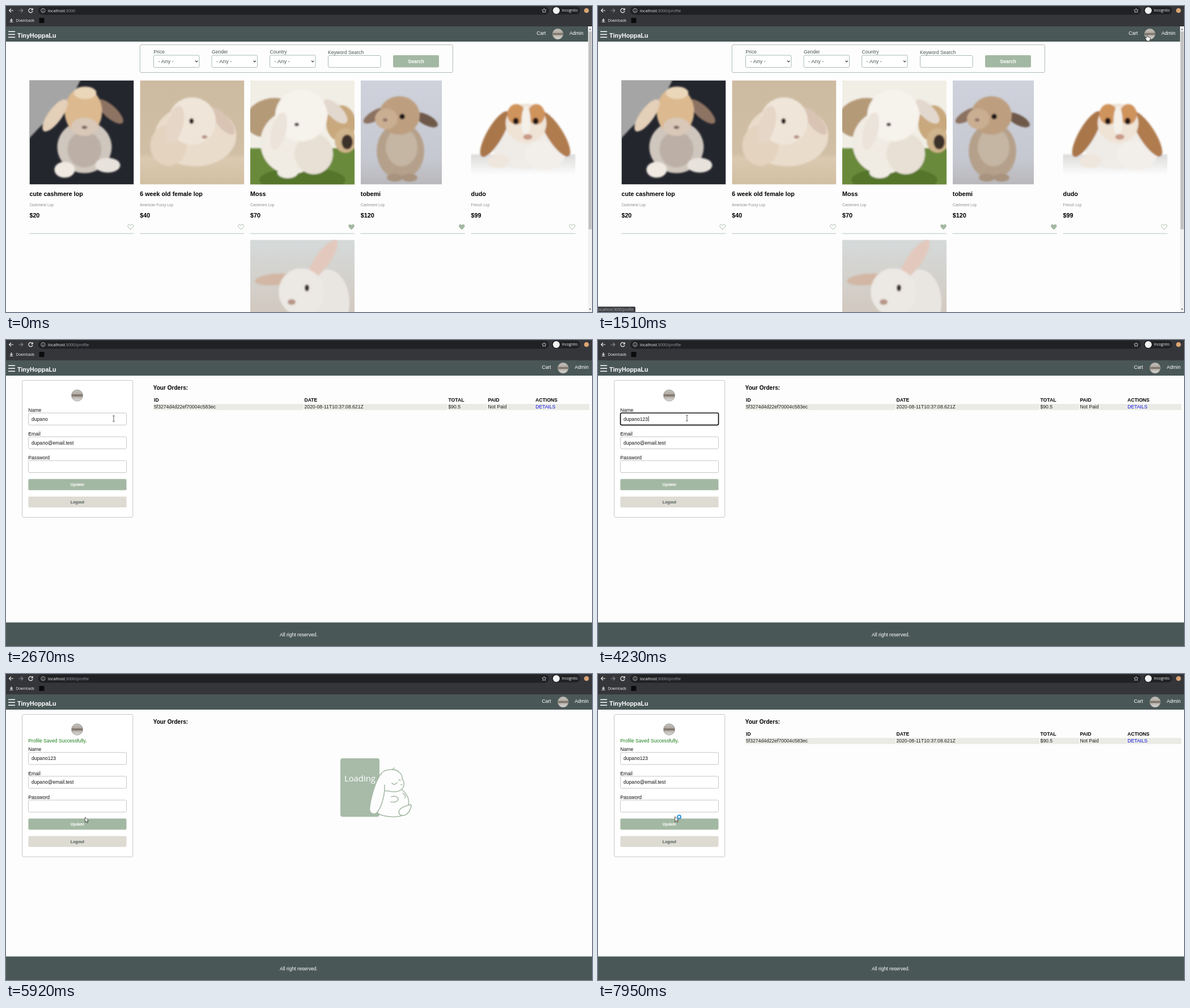
Write an HTML page that moves like this. It is 1034x541 px and loops after 8000 ms.

```html
<!DOCTYPE html>
<html lang="en">
<head>
<meta charset="utf-8">
<title>Rabbit shop profile</title>
<style>
  html, body { margin: 0; width: 100%; height: 100%; overflow: hidden; background: #fdfdfd; }
  svg { display: block; }
  text { font: 8.62px "Liberation Sans", Arial, sans-serif; white-space: pre; }
  .ui { font-family: "Open Sans", "Noto Sans", sans-serif; }
</style>
</head>
<body>
<svg id="stage" width="1034" height="541" viewBox="0 0 1034 541"></svg>
<script>
const SAGE = '#a3b8a3', SLATE = '#4a5757', LOOP = 8000;

// Markup helpers
const text = (x, y, s, o = {}) =>
  `<text x="${x}" y="${y}" fill="${o.fill || '#111'}" class="${o.cls || ''}"` +
  ` style="font-size:${o.size || 8.62}px;font-weight:${o.bold ? 700 : 400}"` +
  ` text-anchor="${o.anchor || 'start'}"${o.id ? ` id="${o.id}"` : ''}>${s}</text>`;
const rect = (x, y, w, h, fill, more = '') =>
  `<rect x="${x}" y="${y}" width="${w}" height="${h}" fill="${fill}" ${more}/>`;
const box = (x, y, w, h, line, id = '') =>
  rect(x, y, w, h, '#fff', `rx="2.2" stroke="${line}" ${id && `id="${id}"`}`);
const line = (d, color, width = 1, more = '') =>
  `<path d="${d}" fill="none" stroke="${color}" stroke-width="${width}" ${more}/>`;
const oval = (x, y, rx, ry, fill, turn = 0) =>
  `<ellipse cx="${x}" cy="${y}" rx="${rx}" ry="${ry}" fill="${fill}" transform="rotate(${turn} ${x} ${y})"/>`;
const group = (id, s, more = '') => `<g id="${id}" ${more}>${s}</g>`;
const fade = (id, ...stops) => `<linearGradient id="${id}" x2="0" y2="1">` +
  stops.map(([at, c]) => `<stop offset="${at}" stop-color="${c}"/>`).join('') + '</linearGradient>';
const photo = (x, y, w, h, back, shapes) =>
  `<svg x="${x}" y="${y}" width="${w}" height="${h}">${rect(0, 0, w, h, back)}` +
  `<g filter="url(#soft)">${shapes.join('')}</g></svg>`;
const avatar = (x, y, r) =>
  `<circle cx="${x}" cy="${y}" r="${r}" fill="url(#fur)" stroke="#8d9391" stroke-width=".8"/>`;

const defs = `<defs><filter id="soft"><feGaussianBlur stdDeviation="1.5"/></filter>` +
  fade('fur', [0, '#c2beb8'], [.35, '#b5aea6'], [.5, '#71685f'], [.65, '#bcb6ae'], [1, '#dcd9d5']) +
  fade('carpet', [0, '#cdbba1'], [.7, '#d0bfa5'], [.75, '#dac9b0'], [1, '#d2bfa3']) +
  fade('wall', [0, '#cfd2dc'], [.75, '#c6c8d1'], [1, '#b9b8bb']) +
  fade('floor', [0, '#dcdbda'], [1, '#fdfdfd']) +
  fade('room', [0, '#d5dada'], [1, '#d2c9c0']) + '</defs>';

const browser = rect(0, 0, 1034, 36, '#35363a') + rect(57, 1, 901, 14.5, '#202124', 'rx="7.2"') +
  line('M13 8H6M9 4.6 5.6 8 9 11.4', '#eee', 1.2) +
  line('M22.5 8h7M26.5 4.6 29.9 8l-3.4 3.4', '#85878a', 1.2) +
  line('M46.6 6.2A3.6 3.6 0 1 0 47 9M47.2 4V7H44', '#eee', 1.2) +
  line('M65.4 7.6V10.4M65.4 5.6V6.6M69 8a3.6 3.6 0 1 1-7.2 0 3.6 3.6 0 1 1 7.2 0', '#d5d6d8', .8) +
  text(74, 10.8, 'localhost<tspan fill="#9aa0a6" id="path"></tspan>', { fill: '#f1f1f1', size: 7.15, cls: 'ui' }) +
  line('M949.5 4.3l1.1 2.5 2.7.3-2 1.8.6 2.7-2.4-1.4-2.4 1.4.6-2.7-2-1.8 2.7-.3z', '#d5d6d8', .8) +
  rect(963, 1, 50, 14, '#202124', 'rx="7"') + oval(971, 8, 6, 6, '#f4f4f4') +
  text(981, 10.4, 'Incognito', { fill: '#f1f1f1', size: 6.4, cls: 'ui' }) +
  oval(1024.3, 8, 4.3, 4.3, '#d9a574') +
  line('M9.5 22v4.5M7.3 24.4l2.2 2.2 2.2-2.2M6.5 28.3h6', '#eee', 1.1) +
  text(17.5, 27.8, 'Downloads', { fill: '#f1f1f1', size: 6.25, cls: 'ui' }) +
  rect(58.5, 21, 9, 9, '#0c0c0c');

const header = rect(0, 36, 1034, 27, SLATE) + line('M4 45.2h12M4 50.2h12M4 55.2h12', '#fff', 1.5) +
  text(20, 55.6, 'TinyHoppaLu', { fill: '#fff', size: 10.77, bold: 1 }) +
  group('account', text(945.5, 51.4, 'Cart', { fill: '#fff' }) + avatar(983, 49.5, 9.4) +
    text(1003.6, 51.4, 'Admin', { fill: '#fff' }));

// Shop page
const filters = rect(236.4, 68.5, 552, 49, 'none', 'rx="2.2" stroke="#adbdb3"') +
  ['Price', 'Gender', 'Country'].map((s, i) => {
    const x = 260.5 + i * 102.5;
    return text(x, 84.4, s, { fill: '#4a5757' }) + box(x, 87, 80.5, 21.5, '#a9bcb0') +
      text(x + 8, 101, '- Any -', { fill: '#4a5757', size: 9.5 }) +
      line(`M${x + 73.5} 96.6l2.2 2.3 2.2-2.3`, '#333', 1.1);
  }).join('') +
  text(568, 84.9, 'Keyword Search', { fill: '#4a5757' }) + box(568.5, 87.5, 92.5, 21, '#a9bcb0') +
  rect(683, 87, 81, 21.5, SAGE, 'rx="2.2"') +
  text(723.5, 100.9, 'Search', { fill: '#fff', bold: 1, anchor: 'middle' });

const HEART = 'M0 4.4C-7.2-.8-4.9-4.3-2.5-4.1-1-4 0-2.9 0-2.3 0-2.9 1-4 2.5-4.1 4.9-4.3 7.2-.8 0 4.4Z';
const card = (i, name, breed, price, liked) => {
  const x = 41.4 + i * 194.8;
  return text(x, 336, name, { size: 10.77, bold: 1, fill: '#000' }) +
    text(x, 353.9, breed, { size: 6.46, fill: '#8c8c8c' }) +
    text(x, 373.8, price, { size: 10.77, bold: 1, fill: '#000' }) +
    `<path d="${HEART}" transform="translate(${x + 178.5} 390.5)" fill="${liked ? SAGE : 'none'}" stroke="${SAGE}"/>` +
    line(`M${x} 402.3h184`, '#b4c7c1', 1.1);
};
const cards = [
  ['cute cashmere lop', 'Cashmere Lop', '$20', 0],
  ['6 week old female lop', 'American Fuzzy Lop', '$40', 0],
  ['Moss', 'Cashmere Lop', '$70', 1],
  ['tobemi', 'Cashmere Lop', '$120', 1],
  ['dudo', 'French Lop', '$99', 0],
].map((c, i) => card(i, ...c)).join('');

const photos =
  photo(41.5, 131.5, 184, 184, '#24262d', [
    '<path d="M-9-9H94L70 40Q38 58-9 112Z" fill="#a5a5a5"/>',
    oval(97, 118, 48, 46, '#cfc6bd'), oval(97, 122, 30, 32, '#bcb0a6'),
    oval(62, 158, 18, 14, '#efe9e2'), oval(138, 150, 22, 13, '#e8e2dc'),
    oval(142, 55, 11, 30, '#8d7362', -48), oval(95, 55, 33, 42, '#dcb98f'),
    oval(98, 22, 20, 11, '#ead6b8'), oval(97, 82, 24, 16, '#d9c8b8'),
    oval(45, 62, 12, 34, '#e4d0b8', 36), oval(97, 83, 5, 3, '#7a6a66')]) +
  photo(236.4, 131.5, 184, 184, 'url(#carpet)', [
    oval(98, 98, 72, 54, '#e9dccb'), oval(50, 115, 32, 36, '#e3d3bf'),
    oval(146, 72, 11, 30, '#d9c3b2', -40), oval(92, 72, 42, 42, '#efe5d9'),
    oval(62, 78, 14, 34, '#e6d6c8', 14), oval(91, 72, 4, 5, '#2b211e'), oval(114, 100, 5, 3, '#b98f86')]) +
  photo(431, 131.5, 184, 184, '#f1eee6', [
    oval(36, 66, 46, 34, '#b59a78', -15), oval(160, 76, 26, 32, '#c8a87c'),
    rect(-9, 120, 210, 80, '#6a8a3a'), oval(92, 176, 76, 22, '#55752c'),
    oval(168, 106, 19, 22, '#d0b48c'), oval(171, 109, 10, 13, '#3c3029'),
    oval(72, 110, 54, 56, '#f1ece3'), oval(112, 130, 34, 36, '#e8e0d4'),
    oval(66, 163, 18, 10, '#f1ece3'), oval(150, 55, 12, 28, '#e3d8ce', -45),
    oval(90, 62, 46, 46, '#f6f2ec'), oval(50, 90, 13, 34, '#ece3da', 14), oval(82, 78, 4, 3, '#4b4340')]) +
  photo(626, 131.5, 143, 184, 'url(#wall)', [
    oval(70, 125, 42, 50, '#b5a08b'), oval(72, 118, 28, 34, '#c5b5a3'),
    oval(60, 172, 14, 7, '#a8937f'), oval(86, 172, 14, 7, '#a8937f'),
    oval(26, 62, 9, 24, '#8a7160', 60), oval(116, 70, 9, 22, '#6d5849', -62),
    oval(68, 62, 36, 34, '#bd9f80'), oval(45, 68, 20, 18, '#c9ae92'),
    oval(73, 64, 5, 5, '#1e1715'), oval(43, 70, 4, 3, '#8b7266')]) +
  photo(820.6, 131.5, 184, 184, '#fdfdfd', [
    rect(-9, 131, 210, 36, 'url(#floor)'),
    oval(95, 115, 58, 42, '#efebe7'), oval(130, 132, 36, 26, '#f2eeea'), oval(48, 143, 20, 12, '#efe6dd'),
    oval(42, 95, 14, 46, '#a9764a', 30), oval(148, 95, 14, 46, '#b07c4e', -32),
    oval(97, 76, 36, 35, '#efe3d6'), oval(80, 60, 16, 18, '#cf935c'), oval(115, 60, 15, 18, '#cf935c'),
    oval(97, 72, 8, 26, '#f4efe9'), oval(79, 72, 5, 6, '#221813'), oval(114, 72, 5, 6, '#221813'),
    oval(100, 100, 8, 5, '#c89a86')]) +
  photo(431, 413.4, 184, 128, 'url(#room)', [
    oval(135, 112, 40, 60, '#e9e6e2'), oval(128, 35, 13, 42, '#e3c9bd', 35),
    oval(44, 70, 10, 36, '#d2b7a4', 85), oval(90, 92, 40, 42, '#ece8e3'),
    oval(100, 85, 4, 6, '#3a2f2a'), oval(73, 110, 7, 5, '#b89787')]);

const scrollbar = rect(1027, 36, 7, 505, '#f1f1f1') + rect(1027.8, 45, 5.6, 350, '#c1c1c1') +
  '<path d="M1028.8 42.2l1.8-2.4 1.8 2.4zM1028.8 535l1.8 2.4 1.8-2.4z" fill="#606060"/>';

// Profile page
const PALE = '#a7bba8';
const loader = rect(590, 149, 69, 103.5, PALE, 'rx="4"') +
  text(597, 190, 'Loading', { fill: '#fff', size: 14.8, cls: 'ui' }) +
  `<g fill="#fdfdfd" stroke="${PALE}" stroke-width="1.6" stroke-linecap="round" stroke-linejoin="round">
    <path d="M664 205C654 222 652 240 657 247 668 253 690 254 700 250 707 250 712 245 715 234 716 230 712 231 710 232 712 222 708 212 698 204Z"/>
    <path d="M662 176C666 171 672 169 679 169 692 168 700 178 699 185 704 192 703 199 698 204 692 209 682 209 676 207L664 206Z"/>
    <path d="M662 176C651 190 643 222 641.5 238 641 248 652 250 656 243 664 232 669 210 668 196" />
    <path fill="none" d="M680 217C688 214 692 218 692 222 690 227 684 227 679 226M710 232C702 234 696 237 694 241 692 246 694 250 700 250M681 193C683 196 687 196 690 192M693 187l3 1M697 196l2-1M682 169l3-3M700 211c4 2 6 5 4 8"/>
  </g>`;

const field = (label, y, value, id) => text(39.3, y, label) +
  box(39.6, y + 2.2, 173, 21.3, '#c3c6c4', id) + text(45, y + 15.8, value, { id: id && id + 'Text' });
const form = field('Name', 126.8, '', 'name') + field('Email', 168.9, 'dupano@email.test') + field('Password', 211, '') +
  rect(39.4, 245.8, 173.2, 19.8, SAGE, 'rx="2.2"') +
  text(126, 258.3, 'Update', { fill: '#fff', size: 7.18, bold: 1, anchor: 'middle' }) +
  rect(39.4, 276.8, 173.2, 19.3, '#dddbd2', 'rx="2.2"') +
  text(126, 289, 'Logout', { fill: SLATE, size: 7.18, bold: 1, anchor: 'middle' }) +
  group('caret', line('M89.3 134.6v9.4', '#111', .8)) +
  group('suggest', rect(39.6, 151.5, 172.8, 51, '#fff', 'stroke="#c8c8c8" stroke-width=".7"') + text(45, 165, 'dupano'));

const columns = [
  [261, 'ID', '5f3274d4d22ef70004c583ec', 525], [526.5, 'DATE', '2020-08-11T10:37:08.621Z', 779],
  [780.5, 'TOTAL', '$90.5', 849], [850.5, 'PAID', 'Not Paid', 933], [934.3, 'ACTIONS', 'DETAILS', 1029.5]];
const orders = columns.map(([x, head, cell, end], i) =>
  rect(x - .5, 113, end - x + .5, 10.8, '#e9ebe4') + text(x, 109.3, head, { bold: 1, fill: '#000' }) +
  text(x, 121.4, cell, { fill: i === 4 ? '#1414e6' : '#222' })).join('');

const profile = box(28.5, 71.5, 195.3, 242, '#c6c8c6', 'panel') + avatar(125.6, 98, 10) +
  group('saved', text(39.3, 121.2, 'Profile Saved Successfully.', { fill: '#1b7d1b' })) +
  group('panelLoader', loader, 'transform="translate(-519 10)"') + group('form', form) +
  text(259.7, 87.6, 'Your Orders:', { size: 10.08, bold: 1, fill: '#000' }) +
  group('orders', orders) + group('ordersLoader', loader) +
  rect(0, 499.4, 1034, 42, SLATE) + text(516.5, 523.6, 'All right reserved.', { fill: '#fff', anchor: 'middle' });

const status = rect(-2, 531.5, 68, 12, '#3b3d40', 'rx="1.5"') +
  text(0, 539.3, 'localhost:3000/profile', { fill: '#b9bcc0', size: 6.2, cls: 'ui' });

const pointer = group('arrow', '<path d="M0 0V9.2L2.1 7.2 3.5 10.4 5 9.8 3.6 6.7H6.4Z" fill="#fff" stroke="#111" stroke-width=".7"/>') +
  group('hand', '<path d="M-.9.8C-.9-.5 1-.5 1 .8V4.6L5.2 5.4Q6.3 5.8 6.1 7L5.3 10.8V12H.3L-2.8 7.4C-3.4 6-2 5.6-.9 7Z" fill="#fff" stroke="#111" stroke-width=".7"/>') +
  group('beam', line('M-1.8-5H1.8M0-5V5M-1.8 5H1.8', '#333', .8)) +
  group('busy', '<circle cx="7.5" cy=".6" r="3" fill="#e9f5ff" stroke="#2a93dd" stroke-width="1.9"/>');

document.getElementById('stage').innerHTML = defs + rect(0, 0, 1034, 541, '#fdfdfd') + browser + header +
  group('shop', filters + photos + cards + scrollbar) + group('profile', profile) +
  group('status', status) + group('pointer', pointer);

const $ = id => document.getElementById(id);
const show = (id, on) => $(id).setAttribute('display', on ? 'inline' : 'none');
const within = (t, a, b) => t >= a && t < b;

// Pointer moves: first step, last step, number of steps, end point
const moves = [
  [250, 790, 8, 1017, 46], [870, 1020, 3, 974, 51], [1110, 1190, 2, 968.5, 50],
  [1740, 2270, 8, 406, 178], [2500, 2670, 3, 190, 139], [2750, 2980, 4, 157, 138],
  [4760, 5460, 10, 139.5, 253], [7790, 7950, 3, 135.7, 252]];

function pointerAt(t) {
  let x = 790, y = 565;
  for (const [start, end, steps, tx, ty] of moves) {
    if (t < start) break;
    const p = Math.min(1, (Math.floor((t - start) / (end - start) * (steps - 1) + 1e-6) + 1) / steps);
    x += (tx - x) * p;
    y += (ty - y) * p;
  }
  return [x, y];
}

function draw(t) {
  const onProfile = t >= 1580;
  show('shop', !onProfile);
  show('profile', onProfile);
  $('account').setAttribute('transform', `translate(${onProfile ? 0 : -9.3} 0)`);
  $('path').textContent = t < 1510 ? ':3000' : ':3000/profile';
  show('status', within(t, 1340, 1900));

  const saving = within(t, 5760, 5920), saved = t >= 5920;
  const shift = saving ? 163 : saved ? 9.7 : 0;
  $('form').setAttribute('transform', `translate(0 ${shift})`);
  $('panel').setAttribute('height', 242 + shift);
  show('saved', saved);
  show('panelLoader', saving);
  const fetching = t < 1980 || within(t, 5840, 6160);
  show('ordersLoader', fetching);
  show('orders', !fetching);

  const typed = [3760, 3980, 4230].filter(at => t >= at).length;
  const focused = within(t, 3150, 5610);
  $('nameText').textContent = 'dupano' + '123'.slice(0, typed);
  $('name').setAttribute('stroke', focused ? '#101010' : '#c3c6c4');
  $('name').setAttribute('stroke-width', focused ? 1.7 : 1);
  show('suggest', within(t, 3220, 3760));
  const lastKey = [3150, 3760, 3980, 4230][typed];
  show('caret', focused && Math.floor((t - lastKey) / 530) % 2 === 0);
  $('caret').setAttribute('transform', `translate(${(typed - 3) * 4.8} 0)`);

  const [x, y] = pointerAt(t);
  const overLink = within(t, 1020, 1740);
  const overField = onProfile && !saving && within(x, 40, 213) &&
    [129, 171, 213].some(top => within(y - shift, top, top + 22));
  show('pointer', t >= 250);
  $('pointer').setAttribute('transform', `translate(${x} ${y})`);
  show('hand', overLink);
  show('beam', overField);
  show('arrow', !overLink && !overField);
  show('busy', t >= 7640);
}

const begin = performance.now();
function tick() {
  draw((performance.now() - begin) % LOOP);
  requestAnimationFrame(tick);
}
tick();
</script>
</body>
</html>
```
